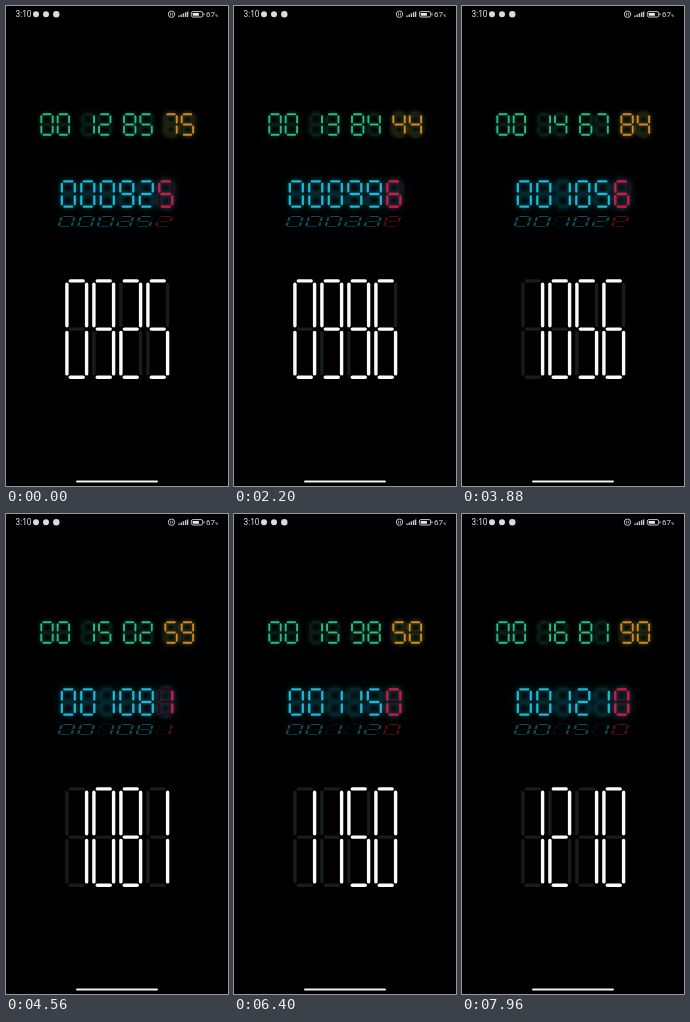
An HTML page for the animation above (8 s loop, 222 by 480 pixels).

```html
<!DOCTYPE html>
<html lang="en">
<head>
<meta charset="utf-8">
<title>Segment counters</title>
<style>
  html, body { margin: 0; width: 100%; height: 100%; overflow: hidden; background: #000; }
  svg { display: block; width: 100vw; height: 100vh; }
  text { font-family: Roboto, sans-serif; fill: #e6e6e6; }
  .row { fill: none; stroke-linecap: round; }
  #split { filter: drop-shadow(0 0 2px #0a8a6490); }
  #split .warm { filter: drop-shadow(0 0 2px #a8540090); }
  #odometer { filter: drop-shadow(0 0 2px #0899b080) drop-shadow(0 0 6px #06586870); }
  #odometer .warm { filter: drop-shadow(0 0 2px #b0003070); }
</style>
</head>
<body>
<svg viewBox="0 0 222 480">
  <rect width="222" height="480" fill="#000"/>

  <g id="status">
    <text x="9.5" y="11.3" font-size="8.3">3:10</text>
    <g fill="#dcdcdc">
      <circle cx="30" cy="8.2" r="3"/>
      <circle cx="40" cy="8.2" r="3"/>
      <circle cx="50.3" cy="8.2" r="3.2"/>
    </g>
    <g fill="none" stroke="#c8c8c8" stroke-width="1">
      <circle cx="165.5" cy="8.2" r="3.2"/>
      <path d="M164.6 6.8v2.8M166.4 6.8v2.8" stroke-width=".8"/>
      <path d="M173 11v-1.6M175.2 11v-2.6M177.4 11v-3.7M179.6 11v-4.8M181.6 11v-5.6" stroke-width="1.4"/>
      <rect x="185.3" y="5.6" width="11.4" height="5.4" rx="1.6"/>
      <path d="M198 7.3v2"/>
    </g>
    <rect x="186.6" y="6.9" width="6.4" height="2.8" rx=".6" fill="#e6e6e6"/>
    <text x="200" y="11.2" font-size="8">67</text>
    <text x="209" y="11" font-size="4.4">%</text>
  </g>

  <g id="split" class="row"></g>
  <g id="odometer" class="row"></g>
  <g id="mirror" class="row" opacity=".42" transform="matrix(1 0 .125 -.4 -25.2 290.8)"></g>
  <g id="tall" class="row"></g>

  <rect x="70" y="474.4" width="82" height="2.2" rx="1.1" fill="#f2f2f2"/>
</svg>
<script>
const NS = 'http://www.w3.org/2000/svg';
const LOOP = 8000, STEP = 40;
// Lit segments of each digit, a to g
const GLYPHS = ['abcdef', 'bc', 'abged', 'abgcd', 'fgbc', 'afgcd', 'afgedc', 'abc', 'abcdefg', 'abcdfg'];
// Counter value at moments of the loop
const KEYS = [[0, 925], [1000, 956], [2200, 996], [3880, 1056], [5280, 1107], [6400, 1150], [7960, 1210], [8000, 1212]];

const $ = id => document.getElementById(id);

function add(parent, tag, attrs) {
  const el = document.createElementNS(NS, tag);
  for (const k in attrs) el.setAttribute(k, attrs[k]);
  parent.appendChild(el);
  return el;
}

function makeDigit(parent, x, y, { w, h, line, gap }, on, off) {
  const r = x + w, m = y + h / 2, b = y + h;
  const across = v => `M${x + gap} ${v}H${r - gap}`;
  const down = (u, from, to) => `M${u} ${from + gap}V${to - gap}`;
  const paths = {
    a: across(y), b: down(r, y, m), c: down(r, m, b), d: across(b),
    e: down(x, m, b), f: down(x, y, m), g: across(m)
  };
  const segs = Object.entries(paths).map(([name, d]) =>
    [name, add(parent, 'path', { d, stroke: off, 'stroke-width': line })]);
  return value => segs.forEach(([name, el]) =>
    el.setAttribute('stroke', GLYPHS[value].includes(name) ? on : off));
}

function makeRow(id, xs, y, size, cool, warm, warmCount) {
  const cold = add($(id), 'g', {}), hot = add($(id), 'g', { class: 'warm' });
  const digits = xs.map((x, i) => i < xs.length - warmCount
    ? makeDigit(cold, x, y, size, ...cool)
    : makeDigit(hot, x, y, size, ...warm));
  return value => {
    const text = String(value).padStart(xs.length, '0');
    digits.forEach((show, i) => show(+text[i]));
  };
}

const spread = (n, start, pitch) => Array.from({ length: n }, (_, i) => start + i * pitch);

const splitXs = spread(4, 35.3, 41.35).flatMap(x => [x, x + 16.4]);
const small = { w: 11.4, h: 20.6, line: 1.9, gap: 2 };
const medium = { w: 13, h: 25.2, line: 2.3, gap: 2.4 };
const large = { w: 19.7, h: 96.4, line: 3.4, gap: 3.4 };

const cyan = ['#1cb9d6', '#08282e'], red = ['#d81840', '#2c0810'];
const oddXs = spread(6, 55.8, 19.5);
const showSplit = makeRow('split', splitXs, 108.2, small,
  ['#25bd8c', '#141c1a'], ['#e0851c', '#22180c'], 2);
const plain = [
  makeRow('odometer', oddXs, 175.4, medium, cyan, red, 1),
  makeRow('mirror', oddXs, 175.4, medium, cyan, red, 1),
  makeRow('tall', spread(4, 60.9, 27), 274.9, large, ['#fafafa', '#151d1d'], null, 0)
];

function counter(t) {
  const i = KEYS.findIndex(k => k[0] > t);
  const [t0, v0] = KEYS[i - 1], [t1, v1] = KEYS[i];
  return Math.round(v0 + (v1 - v0) * (t - t0) / (t1 - t0));
}

let shown;
function render(ms) {
  const t = Math.floor(ms % LOOP / STEP) * STEP;
  const n = counter(t);
  if (n === shown) return;
  shown = n;
  showSplit(n * 139);
  plain.forEach(show => show(n));
}

let start;
function frame(now) {
  start ??= now;
  render(Math.max(0, now - start));
  requestAnimationFrame(frame);
}
render(0);
requestAnimationFrame(frame);
</script>
</body>
</html>
```
